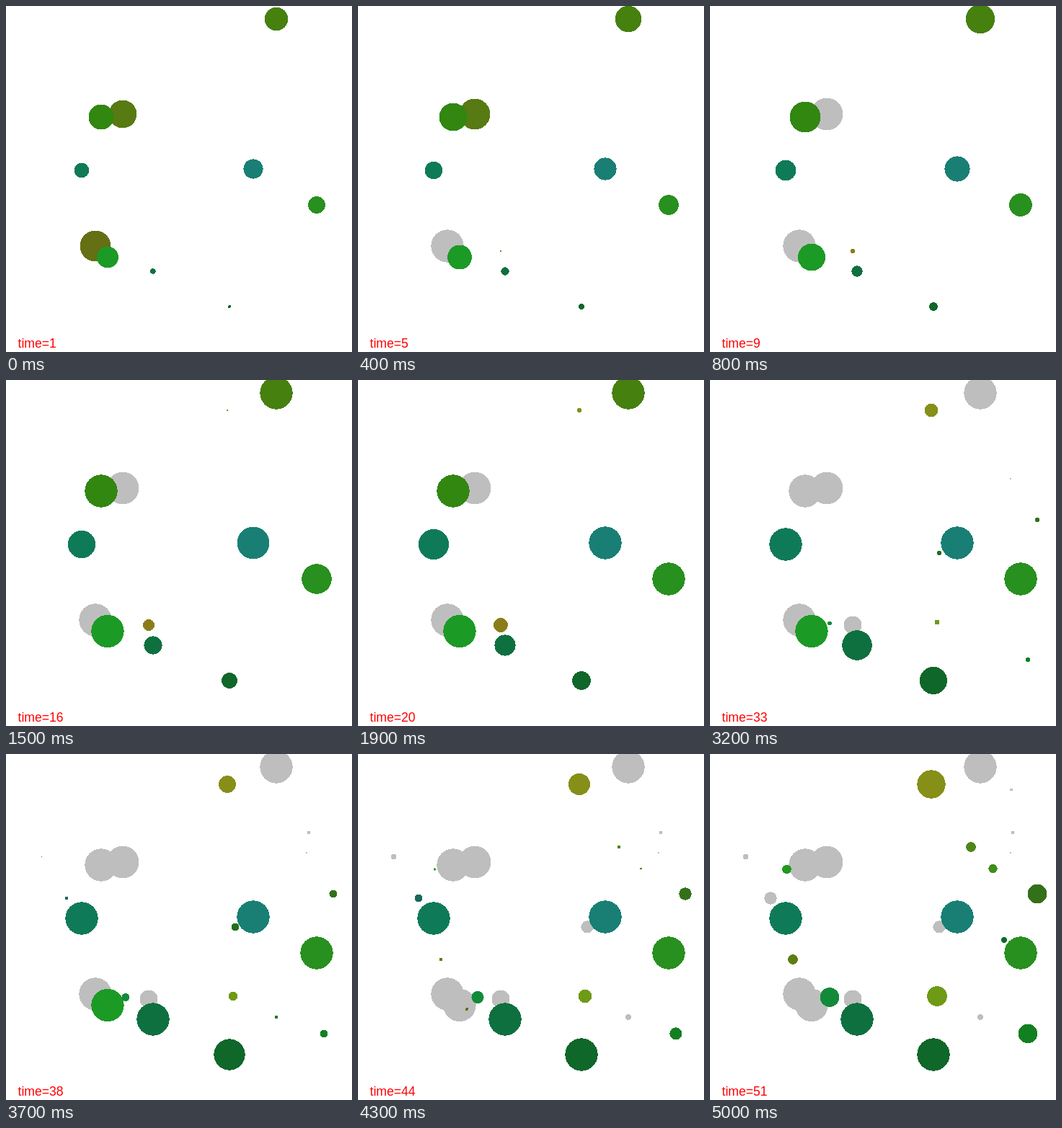
Animation, 480 px wide and 480 px high, one loop 5100 ms. Source, as an HTML page:

```html
<!DOCTYPE html>
<html lang="en">
<head>
<meta charset="utf-8">
<title>Growing discs</title>
<style>
html, body { margin: 0; width: 100%; height: 100%; overflow: hidden; background: #fff; }
svg { display: block; width: 100vw; height: 100vh; }
circle { shape-rendering: crispEdges; }
text { font: 17.6px "Liberation Sans", Arial, sans-serif; fill: #f00; }
</style>
</head>
<body>
<svg viewBox="0 0 480 480">
  <g id="dead"></g>
  <g id="live"></g>
  <text id="label" x="16.5" y="474"></text>
</svg>
<script>
const STEP = 100, STEPS = 51, MAX_R = 22.7, MIN_R = 0.5;

// Total growth in radius at a few steps; linear in between.
const growth = [[1, 0], [9, 4], [16, 8.9], [25, 13.4], [33, 17.1], [44, 22.8], [51, 27.5]];

// x, y, growth level at birth, colour, step of death (optional)
const discs = [
  [375, 18, -16.3, '#46800f', 29],
  [162, 150, -19.4, '#577a12', 7],
  [132, 154, -17.5, '#318710', 21],
  [105, 228, -10.3, '#0f7a58'],
  [343, 226, -13.6, '#197f75'],
  [431, 276, -11.9, '#28901f'],
  [124, 333, -21.5, '#656f13', 5],
  [141, 348.5, -15, '#1c9a26', 39],
  [204, 368, -3.7, '#0f703f'],
  [310, 417, -2, '#0f672a'],
  [198, 340, 0.9, '#8a7d19', 25],
  [307, 42, 7.8, '#868f17'],
  [454, 194, 14.1, '#34701a'],
  [315, 336, 13.6, '#6f9a15'],
  [441, 388, 14.2, '#128020'],
  [166, 337.5, 14.2, '#138a3a'],
  [318, 240, 14.2, '#256f1a', 44],
  [84, 200, 17.5, '#17695e', 49],
  [49.5, 142.5, 18.7, '#2a7d20', 43],
  [375, 365, 17.2, '#1a7a30', 41],
  [417, 137, 13.6, '#2f7a1c', 29],
  [420, 109, 16.5, '#1c6a28', 36],
  [418, 49.5, 22.7, '#3c7f18', 47],
  [106.5, 160, 21.2, '#1f9a1b'],
  [362, 129, 20.6, '#4f861a'],
  [392.5, 159, 21.3, '#3f8d1c'],
  [115, 285, 20.6, '#5d7d12'],
  [151, 354, 20.8, '#5d7010', 48],
  [408, 258, 23.5, '#0c6b2c']
];

const byId = id => document.getElementById(id);
const dead = byId('dead'), live = byId('live'), label = byId('label');

function level(t) {
  let i = 1;
  while (i < growth.length - 1 && t > growth[i][0]) i++;
  const [t0, a] = growth[i - 1], [t1, b] = growth[i];
  return a + (b - a) * (t - t0) / (t1 - t0);
}

function addCircle(parent, x, y, fill) {
  const c = document.createElementNS('http://www.w3.org/2000/svg', 'circle');
  c.setAttribute('cx', x);
  c.setAttribute('cy', y);
  c.setAttribute('fill', fill);
  return parent.appendChild(c);
}

const items = discs.map(([x, y, birth, fill, death = Infinity]) => ({
  birth, death,
  alive: addCircle(live, x, y, fill),
  gone: addCircle(dead, x, y, '#bebebe')
}));

function draw(t) {
  for (const { birth, death, alive, gone } of items) {
    const grown = level(Math.min(t, death)) - birth;
    const r = grown < MIN_R ? 0 : Math.min(grown, MAX_R);
    const isDead = t >= death;
    alive.setAttribute('r', isDead ? 0 : r);
    gone.setAttribute('r', isDead ? r : 0);
  }
  label.textContent = 'time=' + t;
}

let start = null, last = 0;
function tick(now) {
  if (start === null) start = now;
  const t = Math.floor(Math.max(0, now - start) / STEP) % STEPS + 1;
  if (t !== last) draw(last = t);
  requestAnimationFrame(tick);
}

draw(1);
requestAnimationFrame(tick);
</script>
</body>
</html>
```
